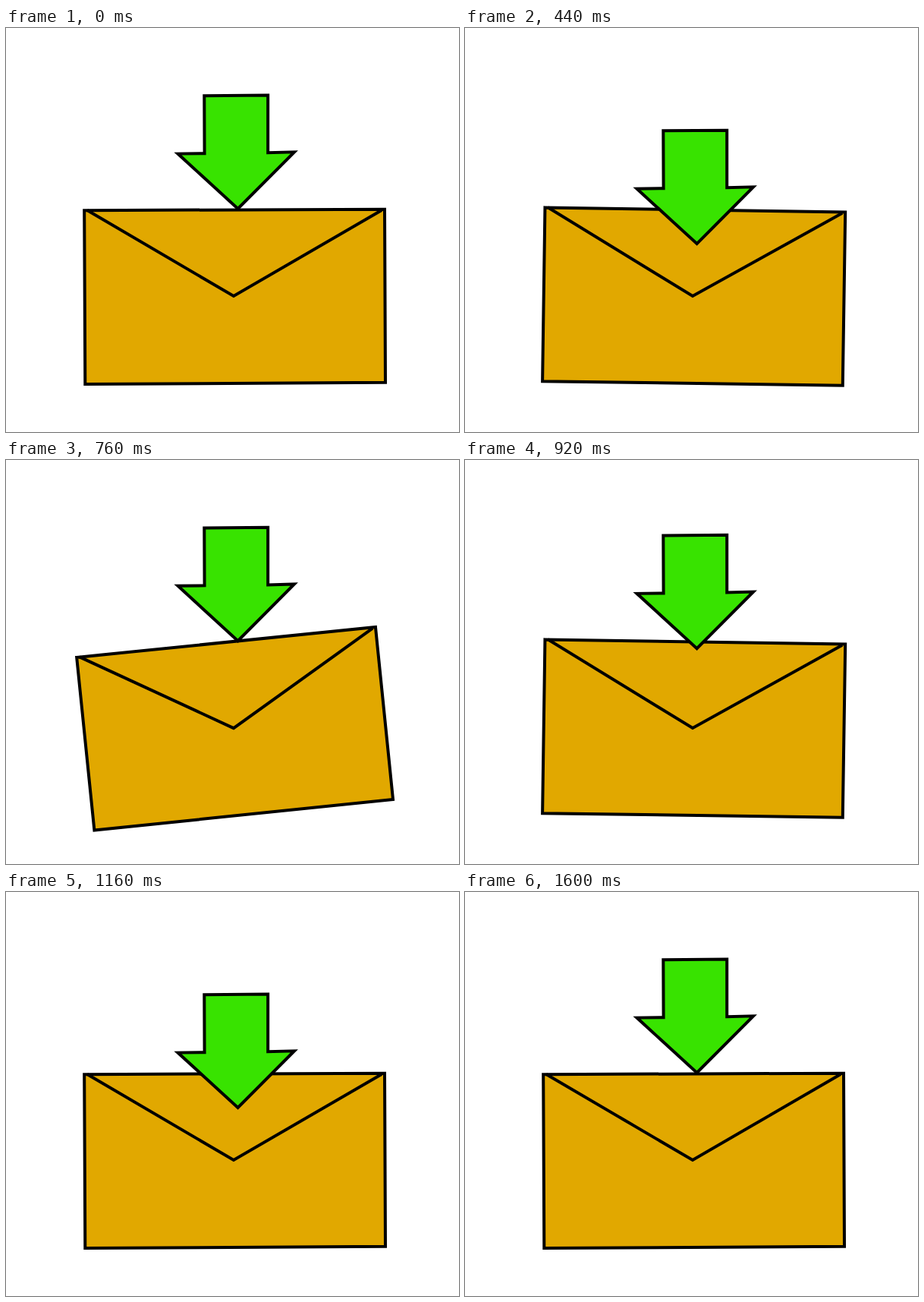
Write an HTML page that moves like this. It is 597 px wide and 532 px high and loops after 1640 ms.

```html
<!DOCTYPE html>
<html lang="en">
<head>
<meta charset="utf-8">
<title>Incoming mail</title>
<style>
  html, body { margin: 0; width: 100%; height: 100%; overflow: hidden; background: #fff; }
  svg { display: block; width: 597px; height: 532px; }
  path { stroke: #000; stroke-width: 4; stroke-miterlimit: 10; }
</style>
</head>
<body>
<svg viewBox="0 0 597 532">
  <g id="mail">
    <path fill="#e1a800" stroke-width="4.4" d="M103.2 240.2 499 238.7 500 466.8 104.3 469Z"/>
    <path fill="none" d="M107 240 300 353 495 240"/>
  </g>
  <path id="arrow" fill="#38e300"
    d="M261.3 89.2 345.2 88.6V164.2L380 163.3 305.6 238 226.5 165.6 261.6 165.2Z"/>
</svg>
<script>
  const LOOP = 1640, STEP = 40, DROP = 46.5;
  const mail = document.getElementById('mail');
  const arrow = document.getElementById('arrow');

  // [time in ms, value]
  const dropKeys = [[0, 0], [62, 0], [418, DROP], [774, 0], [800, 0],
                    [1186, DROP], [1214, DROP], [1600, 0], [LOOP, 0]];
  const tiltKeys = [[0, 0], [420, 0], [540, 6.67], [780, -6.67],
                    [1020, 6.67], [1140, 0], [LOOP, 0]];

  const linear = u => u;
  const sine = u => (1 - Math.cos(Math.PI * u)) / 2;

  function sample(keys, t, ease) {
    const i = keys.findIndex(k => k[0] > t);
    const [t0, a] = keys[i - 1], [t1, b] = keys[i];
    return a + (b - a) * ease((t - t0) / (t1 - t0));
  }

  function draw(now) {
    const t = Math.floor((now % LOOP) / STEP) * STEP;
    arrow.setAttribute('transform', `translate(0 ${sample(dropKeys, t, sine)})`);
    mail.setAttribute('transform', `rotate(${sample(tiltKeys, t, linear)} 301 353.5)`);
  }

  const start = performance.now();
  function tick() {
    draw(performance.now() - start);
    requestAnimationFrame(tick);
  }
  tick();
</script>
</body>
</html>
```
